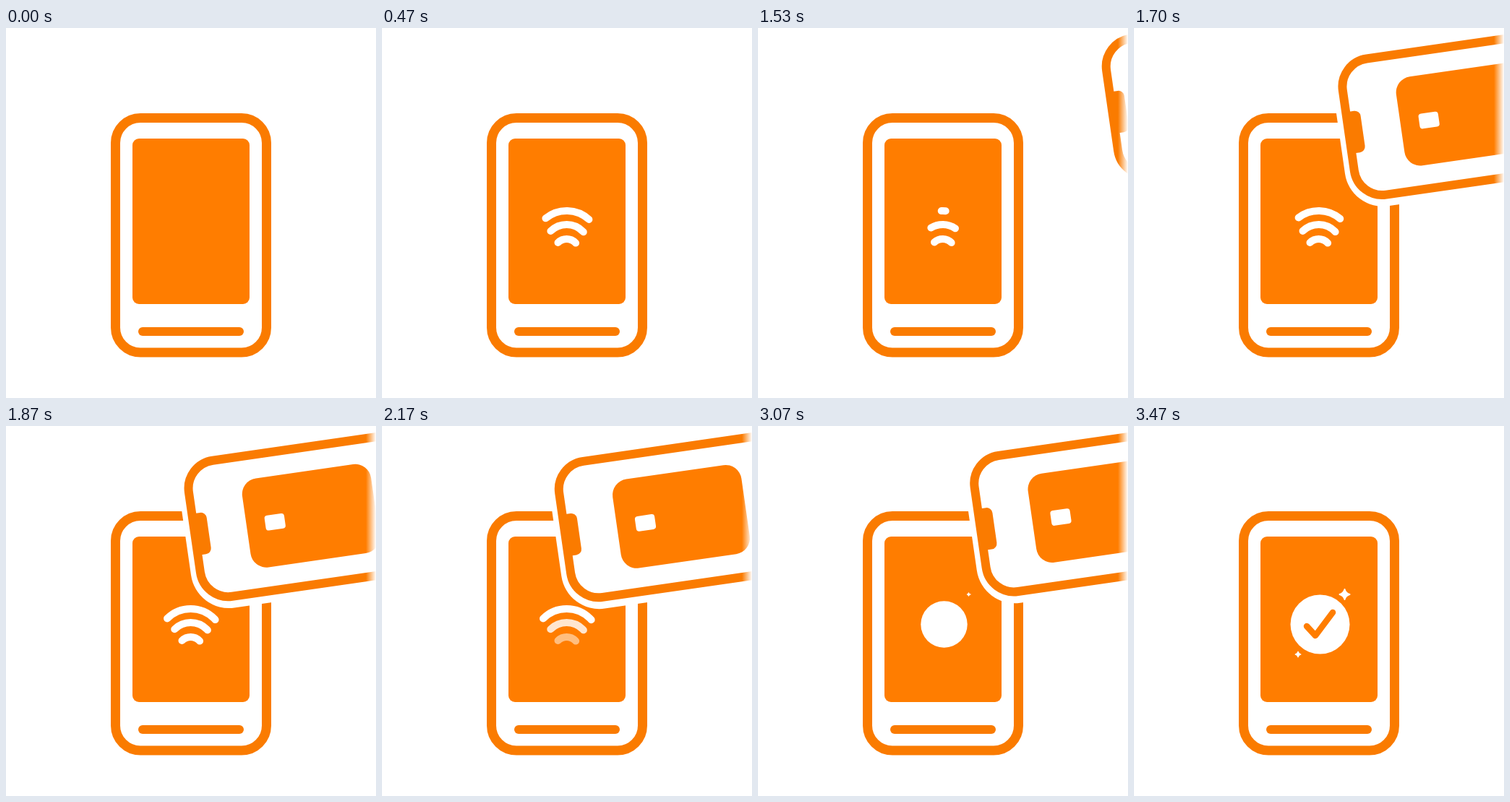
Recreate the animation shown at these times as an HTML page with a canvas. Size 512 by 512 pixels, loop 7000 ms.

```html
<!DOCTYPE html>
<html lang="en">
<head>
<meta charset="utf-8">
<title>Contactless payment</title>
<style>
  html, body { margin: 0; width: 100%; height: 100%; overflow: hidden; background: #fff; }
  canvas { display: block; width: 100vw; height: 100vh; }
</style>
</head>
<body>
<canvas id="stage" width="512" height="512"></canvas>
<script>
const c = document.getElementById('stage').getContext('2d');
const LOOP = 7000, WAVE_CYCLE = 1250, WAVES_END = 2500;
const FILL = '#ff7d00', LINE = '#fa7b00';

const part = (t, start, length) => Math.min(1, Math.max(0, (t - start) / length));
const quadOut = p => 1 - (1 - p) ** 2;
const cubicOut = p => 1 - (1 - p) ** 3;
const expoOut = p => p < 1 ? 1 - 2 ** (-10 * p) : 1;

function box(x, y, w, h, r, fill, stroke, width) {
  c.beginPath();
  c.roundRect(x, y, w, h, r);
  if (fill) { c.fillStyle = fill; c.fill(); }
  if (stroke) { c.strokeStyle = stroke; c.lineWidth = width; c.stroke(); }
}

function terminal() {
  box(151.5, 124.5, 209, 324.5, 34.5, '#fff', LINE, 13);
  box(175, 153, 162, 229, 9, FILL);
  box(183, 414, 146, 12, 6, LINE);
}

// Arcs open from the middle one by one, then fade in the same order.
function waves(t) {
  const radii = [17, 31.5, 46], tops = [292, 272, 253];
  c.strokeStyle = '#fff';
  c.lineWidth = 10;
  radii.forEach((r, i) => {
    const open = cubicOut(part(t, 30 + i * 120, 400));
    if (!open) return;
    const mid = -Math.PI / 2 + 0.026, half = 0.81 * open;
    c.globalAlpha = 1 - part(t, 770 + i * 95, 300);
    c.beginPath();
    c.arc(255.5, tops[i] + r, r, mid - half, mid + half);
    c.stroke();
  });
  c.globalAlpha = 1;
}

function star(x, y, size) {
  if (!size) return;
  c.save();
  c.translate(x, y);
  c.scale(size, size);
  c.beginPath();
  c.moveTo(7, 0);
  c.quadraticCurveTo(1.5, 1.5, 0, 7);
  c.quadraticCurveTo(-1.5, 1.5, -7, 0);
  c.quadraticCurveTo(-1.5, -1.5, 0, -7);
  c.quadraticCurveTo(1.5, -1.5, 7, 0);
  c.closePath();
  c.fillStyle = c.strokeStyle = '#fff';
  c.lineWidth = 2;
  c.fill();
  c.stroke();
  c.restore();
}

function success(t) {
  c.fillStyle = '#fff';
  c.beginPath();
  c.arc(257.5, 274.5, 41 * quadOut(part(t, 2770, 560)), 0, 7);
  c.fill();

  const drawn = quadOut(part(t, 3090, 380));
  if (drawn) {
    const length = Math.hypot(12, 13) + Math.hypot(24, 32);
    c.setLineDash([length * drawn, 100]);
    c.strokeStyle = FILL;
    c.lineWidth = 8.5;
    c.beginPath();
    c.moveTo(239, 277);
    c.lineTo(251, 290);
    c.lineTo(275, 258);
    c.stroke();
    c.setLineDash([]);
  }
  star(291.5, 233, quadOut(part(t, 2970, 500)));
  star(227, 316, 0.56 * quadOut(part(t, 3170, 300)));
}

function phone(t) {
  const shift = 326 * (1 - expoOut(part(t, 1500, 700))) + 300 * part(t, 2770, 700) ** 2;
  c.save();
  c.rotate(-8.2 * Math.PI / 180);
  c.translate(shift, 0);
  box(215.7, 72, 600, 222, 53, '#fff');
  box(229, 88, 600, 190, 39, '#fff', LINE, 12);
  box(225, 157, 23.5, 58, [0, 8, 8, 0], LINE);
  box(301.5, 121, 180, 124.3, 22, FILL);
  box(327.5, 174, 27.5, 21, 4, '#fff');
  c.restore();

  // Soft edge on the right
  const fade = c.createLinearGradient(498, 0, 512, 0);
  fade.addColorStop(0, 'rgba(255,255,255,0)');
  fade.addColorStop(1, '#fff');
  c.fillStyle = fade;
  c.fillRect(498, 0, 14, 512);
}

function draw(t) {
  c.fillStyle = '#fff';
  c.fillRect(0, 0, 512, 512);
  c.lineCap = c.lineJoin = 'round';
  terminal();
  if (t < WAVES_END) waves(t % WAVE_CYCLE);
  if (t > 2770) success(t);
  if (t > 1500 && t < 3470) phone(t);
}

const begin = performance.now();
function tick() {
  draw((performance.now() - begin) % LOOP);
  requestAnimationFrame(tick);
}
tick();
</script>
</body>
</html>
```
